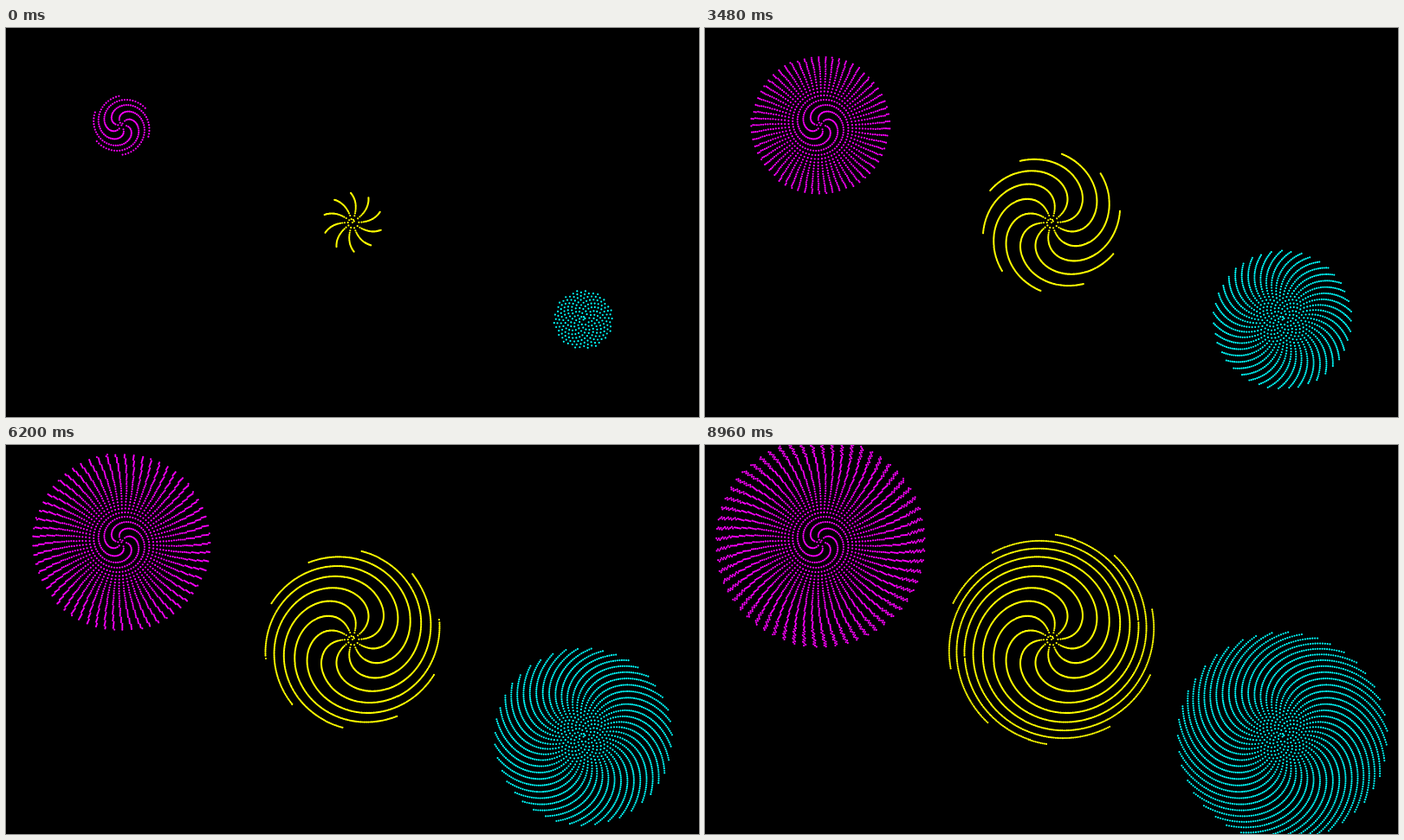
An HTML page with a canvas that plays this animation: 800 by 450 pixels, repeating every 9 s.

```html
<!DOCTYPE html>
<html>
<head>
<meta charset="utf-8">
<title>Phyllotaxis</title>
<style>
html, body { margin: 0; width: 100%; height: 100%; overflow: hidden; background: #000; }
canvas { display: block; }
</style>
</head>
<body>
<canvas id="stage" width="800" height="450"></canvas>
<script>
const ctx = document.getElementById('stage').getContext('2d');
const LOOP = 9000, STEP = 40;
const FIRST = 213, PER_STEP = 11;
const SPREAD = 2.344, DOT = 1.1;

const flowers = [
  { x: 800 / 6, y: 112.5, turn: 137.2, color: '#f0f' },
  { x: 400, y: 225, turn: 137.6, color: '#ff0' },
  { x: 4000 / 6, y: 337.5, turn: 137.5, color: '#0ff' }
];

function drawFlower({ x, y, turn, color }, count) {
  const step = Math.fround(turn);
  ctx.fillStyle = color;
  ctx.beginPath();
  for (let n = 0; n < count; n++) {
    // Single precision makes the outer arms jitter.
    const a = Math.fround(n * step);
    const r = SPREAD * Math.sqrt(n);
    const px = x + r * Math.cos(a);
    const py = y + r * Math.sin(a);
    ctx.moveTo(px + DOT, py);
    ctx.arc(px, py, DOT, 0, 2 * Math.PI);
  }
  ctx.fill();
}

let start, shown = -1;

function frame(now) {
  start ??= now;
  const tick = Math.floor(((now - start) % LOOP) / STEP);
  if (tick !== shown) {
    shown = tick;
    ctx.fillStyle = '#000';
    ctx.fillRect(0, 0, 800, 450);
    for (const f of flowers) drawFlower(f, FIRST + PER_STEP * tick);
  }
  requestAnimationFrame(frame);
}
requestAnimationFrame(frame);
</script>
</body>
</html>
```
